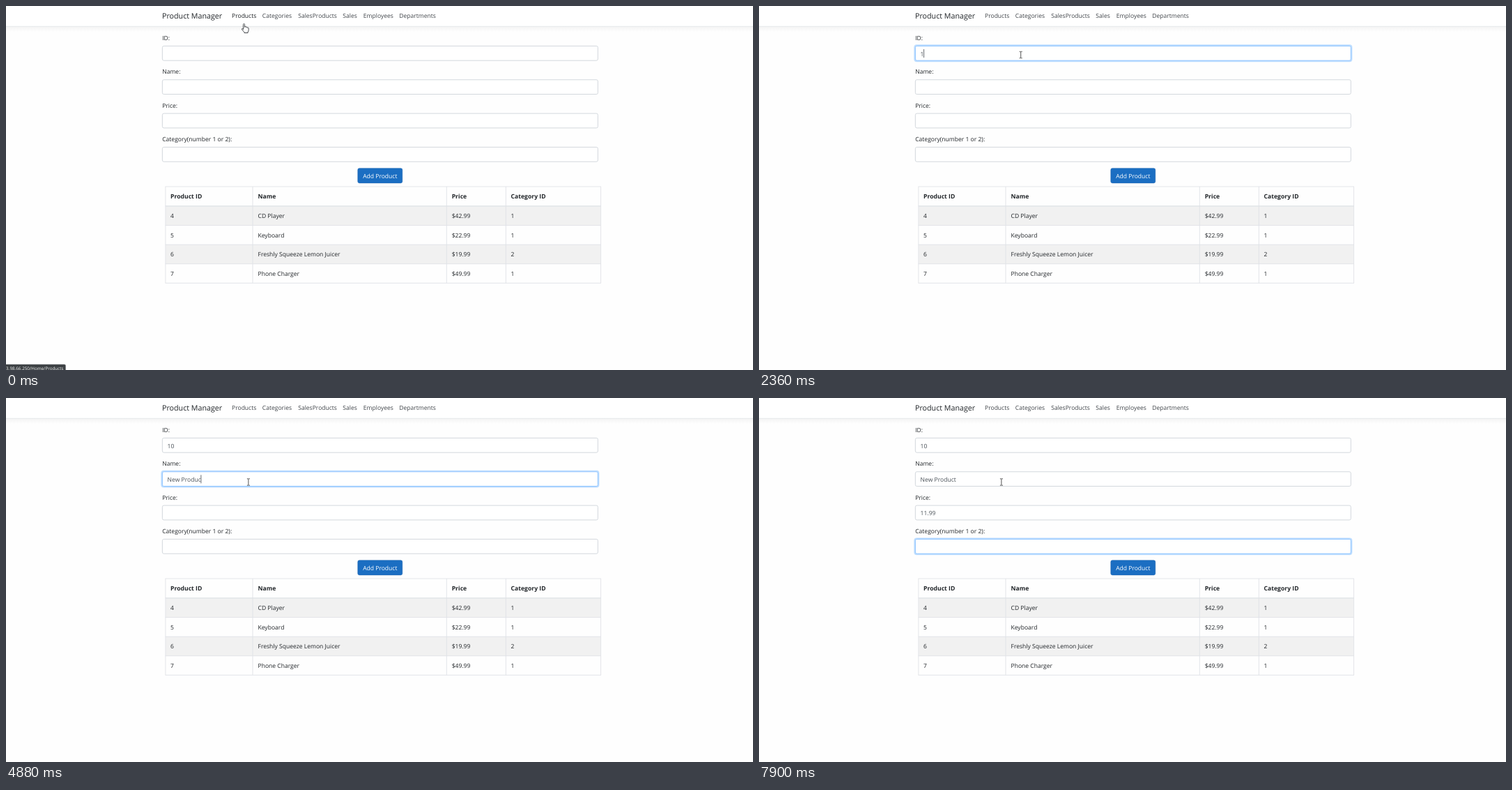
These frames come from a looping animation (1072 by 522 pixels, 8 s). An HTML page:

```html
<!DOCTYPE html>
<html lang="en">
<head>
<meta charset="utf-8">
<title>Product Manager</title>
<style>
  html, body { margin: 0; width: 100%; height: 100%; overflow: hidden; background: #fefefe; }
  svg { display: block; }
  text { font: 8.55px "Open Sans", "Noto Sans", sans-serif; fill: #212529; text-rendering: geometricPrecision; white-space: pre; }
  .brand { font-size: 10.7px; }
  .nav { fill: #40454a; }
  .head { font-size: 8.65px; font-weight: 700; }
  .value { fill: #495057; }
  .button { fill: #fff; }
  .status { font-size: 6.3px; fill: #f1f3f4; }
  .grid { stroke: #e0e3e7; stroke-width: 0.9; fill: none; }
</style>
</head>
<body>
<svg id="stage" width="1072" height="522" viewBox="0 0 1072 522">
  <defs>
    <linearGradient id="shade" x1="0" y1="0" x2="0" y2="1">
      <stop offset="0" stop-color="#f3f3f3"/>
      <stop offset="1" stop-color="#fefefe"/>
    </linearGradient>
  </defs>
</svg>
<script>
const LOOP = 8000, FADE = 150, BLINK = 530;
const stage = document.getElementById('stage');

function add(tag, attrs, content) {
  const el = document.createElementNS('http://www.w3.org/2000/svg', tag);
  for (const key in attrs) el.setAttribute(key, attrs[key]);
  if (content !== undefined) el.textContent = content;
  return stage.appendChild(el);
}
const set = (el, attrs) => { for (const key in attrs) el.setAttribute(key, attrs[key]); };
const label = (x, y, content, cls = '', anchor = 'start') =>
  add('text', { x, y, class: cls, 'text-anchor': anchor }, content);
const clamp = v => Math.max(0, Math.min(1, v));
const progress = (t, from, to) => clamp((t - from) / (to - from));
const smooth = p => p * p * (3 - 2 * p);
const easeOut = p => 1 - (1 - p) ** 2;
const mix = (a, b, p) => a + (b - a) * p;

// Navigation bar
add('rect', { width: 1072, height: 522, fill: '#fefefe' });
add('rect', { y: 29, width: 1072, height: 8, fill: 'url(#shade)' });
add('rect', { width: 1072, height: 29, fill: '#fff' });
add('path', { d: 'M0 29.3H1072', stroke: '#e3e6e9', 'stroke-width': 0.8 });
label(224, 18, 'Product Manager', 'brand');
const links = [
  [324, 'Products'], [367.8, 'Categories'], [419.2, 'SalesProducts'],
  [483.3, 'Sales'], [512.8, 'Employees'], [564.2, 'Departments']
].map(([x, name]) => label(x, 17, name, 'nav'));

// Form: focus span and key times per field
const fields = [
  { title: 'ID:', focus: [1135, 2560], typed: '10', keys: [2300, 2400] },
  { title: 'Name:', focus: [3000, 5670], typed: 'New Product',
    keys: [3940, 4070, 4140, 4210, 4410, 4480, 4610, 4680, 4810, 4880, 5280] },
  { title: 'Price:', focus: [5670, 7360], typed: '11.99', keys: [6440, 6570, 6700, 6900, 7100] },
  { title: 'Category(number 1 or 2):', focus: [7360, LOOP + FADE], typed: '', keys: [] }
];
fields.forEach((field, i) => {
  const y = 57.4 + i * 48.35;
  label(224.2, y - 8.3, field.title);
  field.y = y;
  field.glow = add('rect', { x: 223.3, y: y - 1.1, width: 627.2, height: 22.9, rx: 3, fill: 'none',
    stroke: '#bfdeff', 'stroke-width': 1.9 });
  field.box = add('rect', { x: 224.4, y, width: 625, height: 20.8, rx: 2.2, fill: '#fff', 'stroke-width': 0.9 });
  field.text = label(231.6, y + 14.2, '', 'value');
});
const caret = add('rect', { width: 0.9, height: 12, fill: '#555b61' });

add('rect', { x: 504.8, y: 232.7, width: 64, height: 21.2, rx: 2.3, fill: '#1b6ec2', stroke: '#1861ac', 'stroke-width': 0.5 });
label(536.8, 246.7, 'Add Product', 'button', 'middle');

// Product table
const columns = [236, 361.5, 639.7, 724.5];
const rows = [
  ['4', 'CD Player', '$42.99', '1'],
  ['5', 'Keyboard', '$22.99', '1'],
  ['6', 'Freshly Squeeze Lemon Juicer', '$19.99', '2'],
  ['7', 'Phone Charger', '$49.99', '1']
];
const rowTop = i => 287 + i * 27.6;
['Product ID', 'Name', 'Price', 'Category ID'].forEach((name, c) => label(columns[c], 276.2, name, 'head'));
rows.forEach((row, i) => {
  if (i % 2 === 0) stage.insertBefore(
    add('rect', { x: 229, y: rowTop(i), width: 624.5, height: 27.6, fill: '#f1f1f1' }), links[0]);
  row.forEach((cell, c) => label(columns[c], rowTop(i) + 17.2, cell));
  add('path', { class: 'grid', d: `M228.6 ${rowTop(i + 1)}H854` });
});
add('path', { class: 'grid', d: 'M228.6 259H854M228.9 259V397.4M354 259V397.4M632.3 259V397.4M717.4 259V397.4M853.6 259V397.4' });
add('path', { d: 'M228.6 286.8H854', stroke: '#dee2e6', 'stroke-width': 1.3 });

// Browser status bubble
const bubble = [
  add('rect', { x: -5, y: 514, width: 90.6, height: 14, rx: 1.8, fill: '#3c4043', stroke: '#85888b', 'stroke-width': 0.6 }),
  label(82.4, 521.8, '3.98.66.250/Home/Products', 'status', 'end')
];

// Pointer shapes, hot spot at the origin
const click = add('circle', { r: 6.2, fill: '#fbf63c' });
const outline = { fill: '#fff', stroke: '#33363a', 'stroke-width': 0.9, 'stroke-linejoin': 'round' };
const pointers = {
  hand: add('path', { ...outline, d: 'M-1 8.2V1a1 1 0 0 1 2 0V5l.3-.6a.9.9 0 0 1 1.7.3l.2.4a.9.9 0 0 1 1.7.3l.2.4a.9.9 0 0 1 1.5.6V9q0 1.6-1 2.6V13H.4V12L-3 8.2q-.5-1.3.8-1.2Z' }),
  arrow: add('path', { ...outline, d: 'M0 0V9.5L2.2 7.5 3.6 10.8 5 10.2 3.6 7H6.6Z' }),
  beam: add('path', { d: 'M-2-4.7H-.6L0-4.2.6-4.7H2M-2 4.7H-.6L0 4.2.6 4.7H2M0-4.2V4.2', fill: 'none', stroke: '#3f3f3f', 'stroke-width': 0.9 })
};

function pointerAt(t) {
  const first = smooth(progress(t, 30, 930));
  if (t < 2350) return [mix(341.5, 376.7, first), mix(25.5, 70, first)];
  const p = progress(t, 2350, 3000);
  return [mix(376.7, 347.9, easeOut(p)), mix(70, 120.5, smooth(p))];
}

function drawField(field, t) {
  const [start, end] = field.focus;
  const amount = easeOut(progress(t, start, start + FADE)) * (1 - easeOut(progress(t, end, end + FADE)));
  const count = field.keys.filter(k => k <= t).length;
  field.glow.setAttribute('opacity', amount);
  const [r, g, b] = [[206, 128], [212, 189], [218, 255]].map(([from, to]) => Math.round(mix(from, to, amount)));
  field.box.setAttribute('stroke', `rgb(${r},${g},${b})`);
  field.text.textContent = field.typed.slice(0, count);
  if (t < start || t >= end) return;
  const since = t - (count ? field.keys[count - 1] : start);
  set(caret, {
    x: 231.3 + (count ? field.text.getComputedTextLength() : 0),
    y: field.y + 4.6,
    visibility: Math.floor(since / BLINK) % 2 ? 'hidden' : 'visible'
  });
}

function draw(t) {
  caret.setAttribute('visibility', 'hidden');
  fields.forEach(field => drawField(field, t));

  const [x, y] = pointerAt(t);
  const overField = fields.some(f => y >= f.y && y <= f.y + 21);
  const shape = y < 27 ? 'hand' : overField ? 'beam' : 'arrow';
  for (const name in pointers) set(pointers[name], {
    transform: `translate(${x} ${y})`,
    visibility: name === shape ? 'visible' : 'hidden'
  });
  const clicked = (t >= 1140 && t < 1270) || (t >= 3050 && t < 3125);
  set(click, { cx: x - 0.6, cy: y, visibility: clicked ? 'visible' : 'hidden' });

  links[0].style.fill = shape === 'hand' ? '#1d2124' : '';
  bubble.forEach(el => el.setAttribute('opacity', 1 - progress(t, 380, 640)));
}

const began = performance.now();
function tick() {
  draw((performance.now() - began) % LOOP);
  requestAnimationFrame(tick);
}
tick();
</script>
</body>
</html>
```
